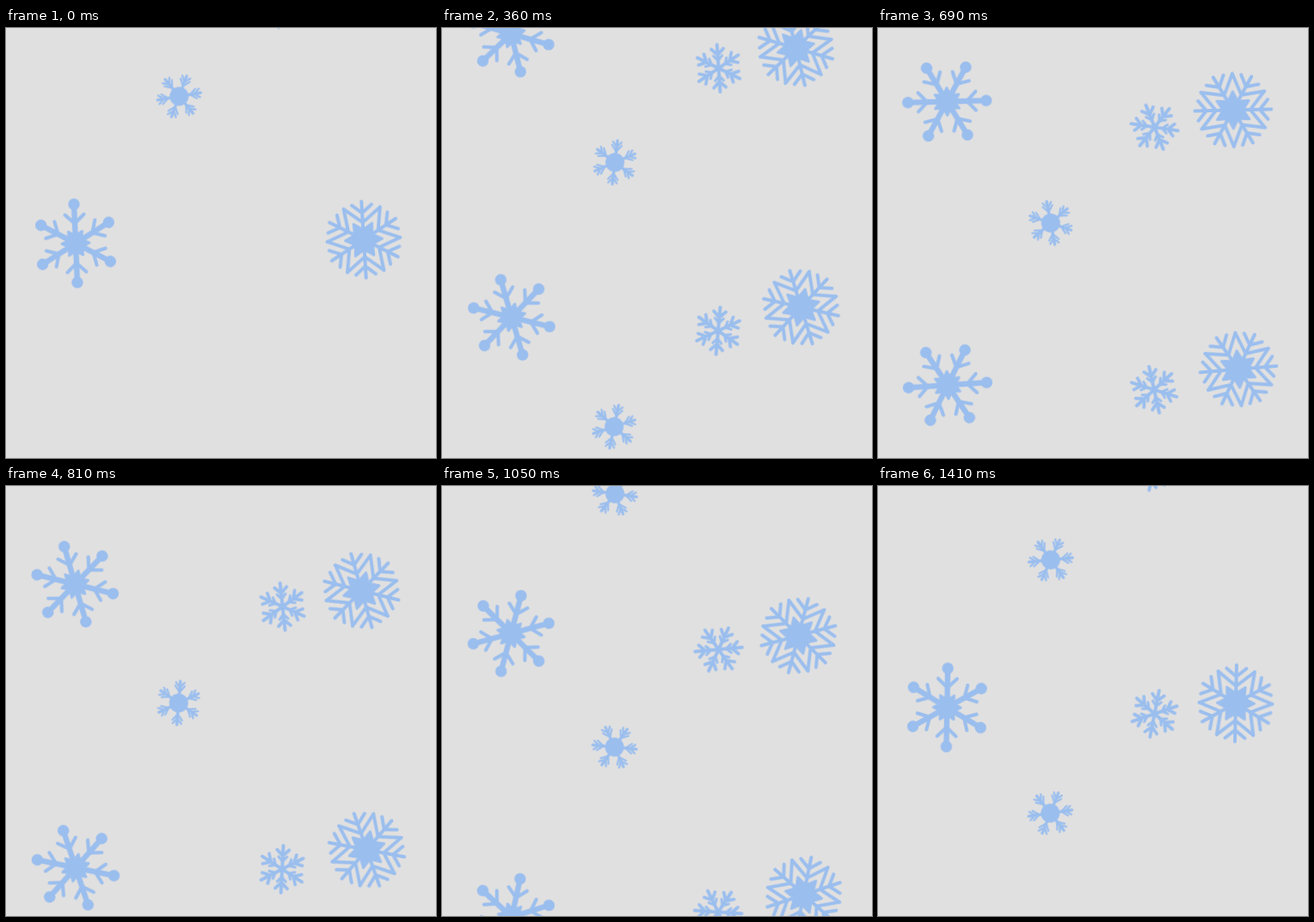
An HTML page for the animation above (1440 ms loop, 500x500 px).

```html
<!DOCTYPE html>
<html lang="en">
<head>
<meta charset="utf-8">
<title>Snowfall</title>
<style>
  html, body { margin: 0; width: 100%; height: 100%; overflow: hidden; background: #e1e0e0; }
  svg { display: block; width: 500px; height: 500px; }
  .arm { fill: none; stroke: #9abeee; stroke-linecap: round; stroke-linejoin: round; }
  .solid { fill: #9abeee; }
  .flake { animation: fall 1440ms steps(48, end) infinite; }
  .late { animation: fall 1440ms steps(48, end) infinite, appear 1440ms step-end infinite; }
  @keyframes fall {
    from { transform: translate(var(--x), var(--y)) rotate(var(--a)); }
    to {
      transform: translate(calc(var(--x) + var(--dx)), calc(var(--y) + var(--dy)))
        rotate(calc(var(--a) + 185.14deg));
    }
  }
  @keyframes appear {
    0% { opacity: 0; }
    2.0833% { opacity: 1; }
  }
</style>
</head>
<body>
<svg id="sky" viewBox="0 0 500 500"></svg>
<script>
const line = (d, w) => `<path class="arm" stroke-width="${w}" d="${d}"/>`;
const disc = (y, r) => `<circle class="solid" cy="${y}" r="${r}"/>`;

// V-shaped twigs: they leave the arm at radius r and end at (±x, -tip)
const twigs = (r, x, tip) => `M${-x} ${-tip}L0 ${-r}L${x} ${-tip}`;

const sixfold = arm =>
  [0, 60, 120, 180, 240, 300].map(a => `<g transform="rotate(${a})">${arm}</g>`).join('');

// Six-pointed core whose tips lie between the arms
function core(outer, inner) {
  const pts = Array.from({ length: 12 }, (_, i) => {
    const r = i % 2 ? outer : inner;
    const a = i * Math.PI / 6;
    return `${(r * Math.sin(a)).toFixed(2)},${(-r * Math.cos(a)).toFixed(2)}`;
  });
  return `<polygon class="solid" stroke="#9abeee" stroke-width="3" stroke-linejoin="round" points="${pts.join(' ')}"/>`;
}

// dx, dy: travel in one loop; at: start x, y, angle and whether it shows up late
const kinds = [
  {
    dx: 0, dy: 344,
    body: sixfold(line('M0 0V-45', 6.5) + line(twigs(23, 11, 33.5), 4) + disc(-45.5, 6.7)) + core(16, 8.5),
    at: [[80.3, -79.3, -.2], [81, 250.4, -2.5]]
  },
  {
    dx: 6.2, dy: 314.4,
    body: sixfold(line('M0 0V-44.5' + twigs(31, 11.5, 40.5) + twigs(20, 21.2, 36.7), 4)) + core(21.5, 11.5),
    at: [[409.9, -55.2, 0], [416, 246.1, -3.5]]
  },
  {
    dx: -1, dy: 307.3,
    body: sixfold(line('M0 0V-25.5', 3.2) + line(twigs(13, 5.6, 20) + twigs(18, 5, 24), 2.3)) + disc(0, 11),
    at: [[201.8, -215, 23.1], [201.3, 79.5, 20.5], [200.4, 386.8, 25.6, true]]
  },
  {
    dx: 0, dy: 299.1,
    body: sixfold(line('M0 0V-27.5' + twigs(15.5, 7, 22.5), 3.8) + line(twigs(9, 5, 14.5), 3)),
    at: [[321.7, -314.6, 12.4], [321.6, -28, 9.8], [321.1, 277.3, 18.8, true]]
  }
];

document.getElementById('sky').innerHTML = kinds.map(({ dx, dy, body, at }) =>
  at.map(([x, y, a, late]) =>
    `<g class="${late ? 'late' : 'flake'}" style="--x:${x}px;--y:${y}px;--a:${a}deg;--dx:${dx}px;--dy:${dy}px">${body}</g>`
  ).join('')
).join('');
</script>
</body>
</html>
```
